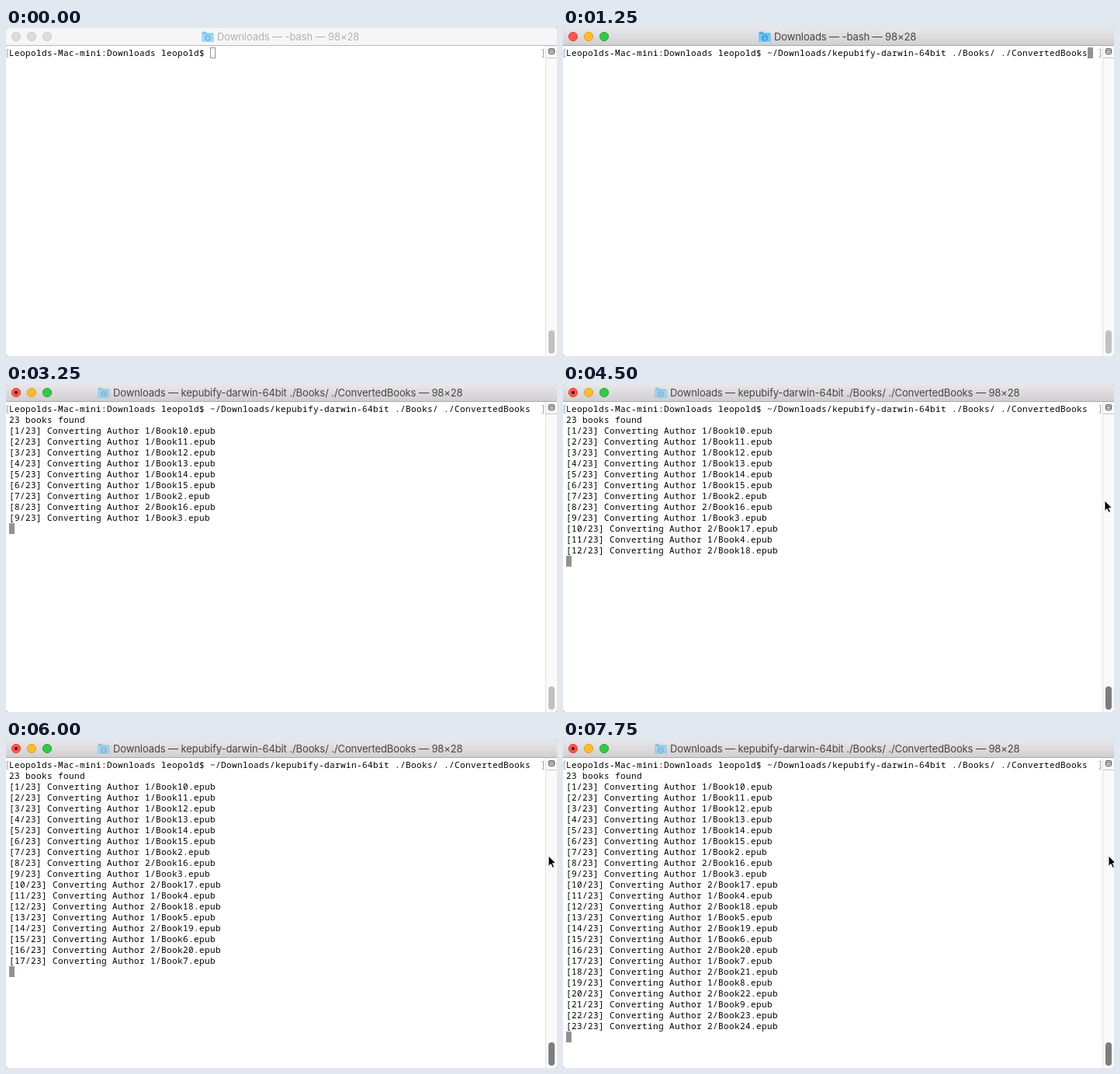
Animation, 710 px wide and 422 px high, one loop 8 s. Source, as an HTML page:

```html
<!DOCTYPE html>
<html lang="en">
<head>
<meta charset="utf-8">
<title>Terminal</title>
<style>
html, body { margin: 0; width: 100%; height: 100%; overflow: hidden; background: #fff; }
svg { display: block; width: 710px; height: 422px; }
.mono { font: 500 11px "Noto Sans Mono", "DejaVu Sans Mono", monospace; letter-spacing: 0.4px; fill: #000; }
.title { font: 400 13px Inter, "Open Sans", sans-serif; letter-spacing: -0.1px; }
</style>
</head>
<body>
<svg viewBox="0 0 710 422" xmlns="http://www.w3.org/2000/svg">
  <defs>
    <linearGradient id="bar" x1="0" y1="0" x2="0" y2="1">
      <stop offset="0" stop-color="#e9e7e9"/>
      <stop offset="1" stop-color="#d1cfd1"/>
    </linearGradient>
    <clipPath id="win"><rect width="710" height="422" rx="4"/></clipPath>
  </defs>
  <rect width="710" height="422" fill="#c4b4ae"/>
  <g clip-path="url(#win)">
    <rect width="710" height="422" fill="#fff"/>
    <rect id="head" width="710" height="22"/>
    <rect id="rule" y="22" width="710" height="1"/>
    <g id="lights" stroke-width="1">
      <circle cx="13" cy="11" r="5.6"/>
      <circle cx="33" cy="11" r="5.6"/>
      <circle cx="53" cy="11" r="5.6"/>
    </g>
    <circle id="busy" cx="13" cy="11" r="2" fill="#4d0000"/>

    <g id="folder">
      <path d="M0.5 2Q0.5 0.8 1.7 0.8H5.2L6.8 2.4H14.3Q15.5 2.4 15.5 3.6V13Q15.5 14 14.5 14H1.5Q0.5 14 0.5 13Z" fill="#4fb0e3"/>
      <path d="M0.5 4.2H15.5V13Q15.5 14 14.5 14H1.5Q0.5 14 0.5 13Z" fill="#76caf5"/>
      <circle cx="8" cy="8.8" r="3.9" fill="#36a0dc"/>
      <path d="M8 6.6V10.6M6.2 9L8 10.8L9.8 9" fill="none" stroke="#a5dcf8"/>
    </g>
    <text id="title" class="title" y="16"/>

    <rect x="695" y="23" width="15" height="399" fill="#fafafa"/>
    <rect x="695" y="23" width="1" height="399" fill="#e2e2e2"/>
    <path d="M696 38.5H710" stroke="#c6c6c6"/>
    <rect x="699.5" y="26.5" width="7" height="7" rx="1" fill="#e8e8e8" stroke="#555"/>
    <path d="M700 28.5H706M700 31H706" stroke="#555"/>
    <rect id="thumb" x="699" y="389" width="8" height="30" rx="4"/>

    <path d="M3.5 27.5H1.5V37.5H3.5M690.5 27.5H692.5V37.5H690.5" fill="none" stroke="#a6a6a6"/>
    <g id="lines" class="mono"></g>
    <rect id="caret" stroke="#929292"/>

    <path id="beam" d="M-3.5 -7.5H-2Q0 -7.5 0 -5.5Q0 -7.5 2 -7.5H3.5M0 -5.5V5.5M-3.5 7.5H-2Q0 7.5 0 5.5Q0 7.5 2 7.5H3.5M-1.5 2.5H1.5" fill="none" stroke="#000" stroke-width="1.2"/>
    <path id="arrow" d="M0 0V13.5L3.1 10.6L5.2 15.4L7.5 14.4L5.4 9.7H9.7Z" fill="#000" stroke="#fff"/>
  </g>
</svg>
<script>
const STEP = 250, LOOP = 8000, ROW = 14, CELL = 7;
const PROMPT = "Leopolds-Mac-mini:Downloads leopold$ ";
const COMMAND = "~/Downloads/kepubify-darwin-64bit ./Books/ ./ConvertedBooks";
const TOTAL = 23;
const el = id => document.getElementById(id);
const set = (node, attrs) => {
  for (const k in attrs) node.setAttribute(k, attrs[k]);
};

// [time, value] pairs; each value holds until the next time
const typed = [[0, 0], [750, 12], [1000, 34], [1250, COMMAND.length]];
const done = [[0, 0], [1500, 1], [1750, 3], [2000, 5], [2250, 6], [2500, 7], [3250, 9],
  [4000, 10], [4250, 11], [4500, 12], [4750, 14], [5250, 15], [5500, 16], [6000, 17],
  [6250, 18], [6750, 19], [7000, 20], [7250, 21], [7500, 22], [7750, 23]];
const beamAt = [[0, null], [250, [668, 246]], [500, [664, 243]], [750, null],
  [4000, [683, 156]], [4250, null]];
const arrowAt = [[0, null], [4250, [697, 146]], [4500, [698, 150]], [4750, [699, 149]],
  [6250, [700, 148]], [6500, [701, 148]], [7000, [702, 149]], [7500, [703, 149]]];

const hold = (keys, t) => keys.reduce((v, [at, val]) => t >= at ? val : v, keys[0][1]);

function bookLine(n) {
  let author = 1, book;
  if (n <= 6) book = 9 + n;
  else if (n === TOTAL) { author = 2; book = 24; }
  else if (n % 2) book = (n - 3) / 2;
  else { author = 2; book = 12 + n / 2; }
  return `[${n}/${TOTAL}] Converting Author ${author}/Book${book}.epub`;
}

const rows = Array.from({ length: TOTAL + 2 }, (_, i) => {
  const row = document.createElementNS("http://www.w3.org/2000/svg", "text");
  set(row, { x: 4, y: 36 + i * ROW });
  el("lines").appendChild(row);
  return row;
});

function place(id, pos) {
  set(el(id), pos
    ? { visibility: "visible", transform: `translate(${pos[0]} ${pos[1]})` }
    : { visibility: "hidden" });
}

function drawBar(active, running) {
  const colors = active ? ["#fc5650", "#fdbc2f", "#34c749"] : ["#dcdcdc", "#dcdcdc", "#dcdcdc"];
  const edges = active ? ["#e0443e", "#dfa023", "#24aa35"] : ["#cdcdcd", "#cdcdcd", "#cdcdcd"];
  [...el("lights").children].forEach((dot, i) => set(dot, { fill: colors[i], stroke: edges[i] }));
  set(el("head"), { fill: active ? "url(#bar)" : "#f6f6f6" });
  set(el("rule"), { fill: active ? "#aaa8aa" : "#b9b9b9" });
  set(el("busy"), { visibility: running ? "visible" : "hidden" });
  set(el("folder"), {
    transform: `translate(${running ? 118 : 252} 4)`,
    opacity: running ? 0.55 : active ? 1 : 0.65
  });
  set(el("title"), { x: running ? 138 : 272, fill: active ? "#464646" : "#b2b2b2" });
  const job = running ? COMMAND.replace("~/Downloads/", "") : "-bash";
  el("title").textContent = `Downloads — ${job} — 98×28`;
}

function draw(t) {
  const active = t >= 250, running = t >= 1500;
  const count = hold(done, t), chars = hold(typed, t);
  drawBar(active, running);

  rows.forEach((row, i) => {
    let text = "";
    if (i === 0) text = (PROMPT + COMMAND.slice(0, chars)).trimEnd();
    else if (running && i === 1) text = TOTAL + " books found";
    else if (i >= 2 && i - 1 <= count) text = bookLine(i - 1);
    if (row.textContent !== text) row.textContent = text;
  });

  const col = running ? 0 : PROMPT.length + chars;
  const line = running ? count + 2 : 0;
  set(el("caret"), {
    x: 4.5 + col * CELL, y: 25.5 + line * ROW, width: 6, height: 13,
    fill: active ? "#929292" : "none"
  });

  const pointer = hold(arrowAt, t);
  place("beam", hold(beamAt, t));
  place("arrow", pointer);
  set(el("thumb"), { fill: pointer ? "#7d7d7d" : "#c1c1c1" });
}

let start = null, last = -1;
function tick(now) {
  if (start === null) start = now;
  const step = Math.floor(((now - start) % LOOP) / STEP);
  if (step !== last) draw((last = step) * STEP);
  requestAnimationFrame(tick);
}
draw(0);
requestAnimationFrame(tick);
</script>
</body>
</html>
```
